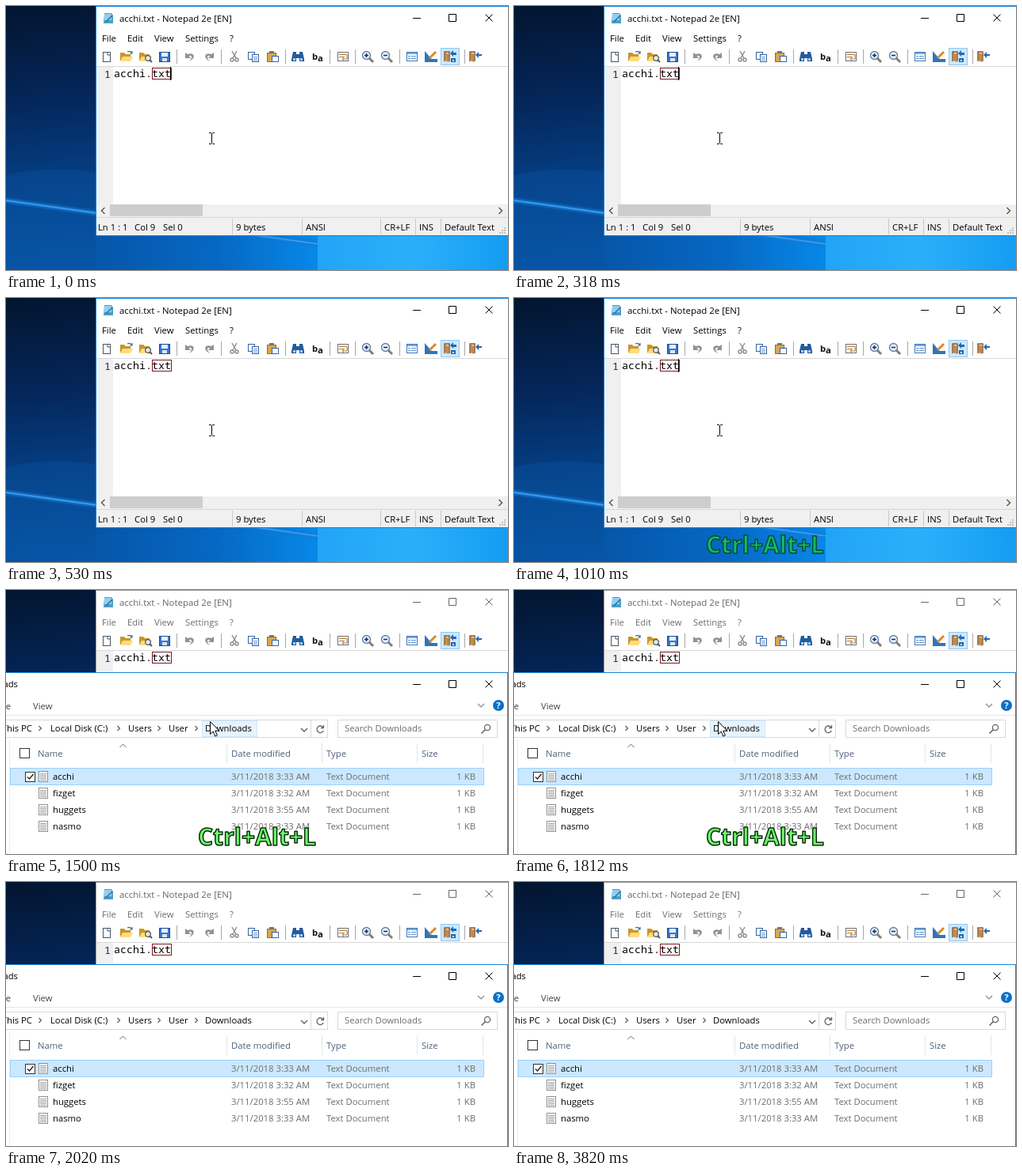
Animation of 633x334 px, one loop 5020 ms. Source, as an HTML page:

```html
<!DOCTYPE html>
<html lang="en">
<head>
<meta charset="utf-8">
<title>Show file in folder</title>
<style>
html, body { margin: 0; width: 100%; height: 100%; overflow: hidden; background: #04204a; }
svg { display: block; width: 633px; height: 334px; font: 11.3px "Open Sans", sans-serif; }
text { white-space: pre; }
rect { shape-rendering: crispEdges; }
.mono { font: 13.33px "Noto Sans Mono", monospace; }
.hint { font: bold 30px "Open Sans", sans-serif; stroke-width: 1.5px; stroke-linejoin: round; }
</style>
</head>
<body>
<svg id="stage" viewBox="0 0 633 334"></svg>
<script>
const stage = document.getElementById('stage');

const text = (x, y, s, fill = '#000', extra = '') => `<text x="${x}" y="${y}" fill="${fill}" ${extra}>${s}</text>`;
const box = (x, y, w, h, fill, extra = '') => `<rect x="${x}" y="${y}" width="${w}" height="${h}" fill="${fill}" ${extra}/>`;
const frame = (x, y, w, h, stroke, fill = 'none') => box(x + .5, y + .5, w - 1, h - 1, fill, `stroke="${stroke}"`);
const line = (d, stroke = '#333', width = 1, fill = 'none') => `<path d="${d}" stroke="${stroke}" stroke-width="${width}" fill="${fill}"/>`;
const fill = (d, color) => `<path d="${d}" fill="${color}"/>`;
const disc = (x, y, r, color, stroke = 'none', w = 1) => `<circle cx="${x}" cy="${y}" r="${r}" fill="${color}" stroke="${stroke}" stroke-width="${w}"/>`;
const at = (x, y, s) => `<g transform="translate(${x} ${y})">${s}</g>`;
const group = (id, s) => `<g id="${id}">${s}</g>`;

const captionButtons = y => line(`M513 ${y + .5}h10M558.5 ${y - 4.5}h9v9h-9zM604.5 ${y - 4.5}l9 9m0-9l-9 9`, 'currentColor');

function gradient(id, dir, ...stops) {
  const marks = stops.map(([pos, color]) => `<stop offset="${pos}" stop-color="${color}"/>`).join('');
  return `<linearGradient id="${id}" ${dir}>${marks}</linearGradient>`;
}

function wallpaper() {
  const down = 'x1="0" y1="0" x2="0" y2="1"';
  return gradient('sky', 'x1="0" y1="0" x2=".2" y2="1"', [0, '#03152f'], [.35, '#04265a'], [.6, '#053a7c'], [1, '#06509e']) +
    gradient('floor', '', [0, '#0656a8'], [.3, '#0668c4'], [.55, '#078aea'], [1, '#12a0f8']) +
    gradient('pane', '', [0, '#22a4f6'], [.5, '#2ab0fa'], [1, '#159cf2']) +
    gradient('beam', down, [0, '#0e6cc600'], [.5, '#1c84e0'], [1, '#0e6cc600']) +
    box(0, 0, 633, 334, 'url(#sky)') +
    fill('M0 214Q50 202 114 210V262L0 246Z', '#0b62b440') +
    fill('M0 247L420 306V334H0Z', '#0a62b855') +
    box(113, 291, 520, 43, 'url(#floor)') +
    `<g transform="rotate(8 0 246)">${box(0, 241, 400, 10, 'url(#beam)')}</g>` +
    line('M0 246L400 302', '#3c9eee', 1.6) +
    box(393, 291, 240, 43, 'url(#pane)');
}

function page(x, y, w = 9, h = 12, edge = '#456') {
  return frame(x, y, w, h, edge, '#fff');
}

function folder(extra) {
  return fill('M-8-5h5l2 2h6v8h-13z', '#c9962c') + fill('M-5 0h13l-3 6h-13z', '#ffdc7c') + extra;
}

function lens(sign) {
  return line('M2 2l5 5', '#8a7a74', 3) + disc(-1.5, -1.5, 5, '#e4f2ff', '#66809c', 1.4) + line(sign, '#226', 1.5);
}

function door() {
  return line('M-7 6V-6H-1V6', '#8b5a2b', 1.5, '#f2dfc0') + fill('M-6-5l4 2v10l-4-2z', '#c58a48');
}

const undo = fill('M-6-5v7h7l-2.5-2.5C2-3 4 1-1 6C8 2 6-6-3-3z', '#8d9498');

const icons = [
  [127, page(-5, -6, 10, 13) + line('M1-6v4h4', '#456')],
  [152, folder(line('M1-6q4-2 6 2m0-3v3h-3', '#278', 1.2))],
  [176, folder(disc(3, 2, 3.3, '#d8efff', '#555', 1.2) + line('M5 4l3 3', '#555', 2))],
  [200, frame(-7, -6, 14, 13, '#174a94', '#3777cc') + box(-4, -5, 8, 5, '#e8f2ff') + box(-3, 2, 6, 4, '#dfe6ee')],
  [232, undo],
  [256, `<g transform="scale(-1 1)">${undo}</g>`],
  [288, line('M-3-7L2 2M3-7L-2 2', '#8b9095', 1.5) + disc(-3, 4, 2, 'none', '#8b9095', 1.5) + disc(3, 4, 2, 'none', '#8b9095', 1.5)],
  [312, page(-7, -6, 9, 10, '#37639c') + page(-2, -3, 9, 10, '#37639c') + line('M0 .5h5M0 2.5h5M0 4.5h5', '#6c9bd8')],
  [336, frame(-7, -5, 12, 12, '#9b6a22', '#d9a650') + box(-4, -7, 6, 3, '#777') + page(-1, -1, 9, 8, '#37639c')],
  [368, fill('M-6-6h4v3h4v-3h4l2 9v3h-6v-4h-4v4h-6v-3z', '#245b9d') + box(-6, 2, 3, 3, '#9fd0ff') + box(3, 2, 3, 3, '#9fd0ff')],
  [393, text(-7, 4, 'b', '#111', 'font-weight="700"') + text(0, 6, 'a', '#111', 'font-weight="700"')],
  [425, frame(-7, -6, 14, 12, '#68707c', '#fff') + line('M-5-2.5h10M-5 .5h7M5-2v5h-6m2-2l-2 2l2 2', '#b07a28')],
  [456, lens('M-4-1.5h5M-1.5-4v5')],
  [480, lens('M-4-1.5h5')],
  [512, frame(-7, -6, 14, 12, '#3b78bd', '#fff') + box(-6, -5, 12, 2, '#6eaaf0') + line('M-5-.5h3m1 0h6M-5 2.5h3m1 0h6', '#5a8bc4')],
  [536, fill('M-8-7L4 7H-8z', '#2f75bd') + box(-8, 3, 16, 4, '#2f75bd') + line('M-2 2L6-6', '#d58a31', 3)],
  [560, door() + fill('M8-5h-4v-3l-4 4 4 4v-2h4z', '#2468ad') + box(1, 2, 6, 5, '#2468ad') + box(3, 4, 2, 2, '#fff')],
  [592, door() + fill('M8-3h-4v-3l-4 4 4 4v-3h4z', '#2468ad')],
];

function editor() {
  const menus = [[121, 'File'], [153, 'Edit'], [187, 'View'], [226, 'Settings'], [282, '?']];
  const status = [[116, 'Ln 1 : 1'], [162, 'Col 9'], [198, 'Sel 0'], [290, '9 bytes'], [378, 'ANSI'],
    [477, 'CR+LF'], [521, 'INS'], [553, 'Default Text']];
  return box(113, 0, 520, 291, '#fff') +
    fill('M124 9h9l2 3v10h-12z', '#4a9fc8') + box(124, 10, 9, 8, '#8fd0f2') + line('M126 20l8-8', '#2a6d9c', 1.5) +
    group('title', text(143, 20, 'acchi.txt - Notepad 2e [EN]', 'currentColor', 'font-size="11.45"') + captionButtons(15)) +
    group('menu', menus.map(([x, s]) => text(x, 45, s, 'currentColor')).join('')) +
    frame(548, 53, 24, 22, '#90c8f6', '#cce8ff') +
    [215, 271, 352, 408, 440, 496, 578].map(x => box(x, 55, 1, 18, '#a8a8a8')).join('') +
    icons.map(([x, s]) => at(x, 64, s)).join('') +
    box(114, 76, 519, 1, '#d8d8d8') + box(114, 77, 21, 174, '#f0f0f0') +
    text(124, 91, '1', '#302048', 'class="mono"') + text(136, 90, 'acchi.txt', '#000', 'class="mono"') +
    frame(184, 78, 25, 15, '#7c1620') + group('caret', box(207, 77, 1, 17, '#000')) +
    box(114, 251, 519, 16, '#f0f0f0') + box(131, 251, 117, 15, '#cdcdcd') +
    line('M124.5 255l-4 4 4 4M621.5 255l4 4-4 4', '#70583c', 1.5) +
    box(114, 267, 519, 23, '#f0f0f0') + box(114, 267, 519, 1, '#d7d7d7') +
    [285, 373, 472, 516, 548].map(x => box(x, 269, 1, 20, '#c8c8c8')).join('') +
    status.map(([x, y]) => text(x, 284, y)).join('') +
    [0, 1, 2].map(i => [0, 1, 2].map(j => i + j > 1 ? box(622 + i * 3, 280 + j * 3, 2, 2, '#bfbfbf') : '').join('')).join('') +
    group('edge', box(113, 0, 1, 291, 'currentColor') + box(113, 0, 520, 1, 'currentColor') + box(113, 290, 520, 1, 'currentColor'));
}

function explorer() {
  const crumbs = [[56, 'Local Disk (C:)'], [154, 'Users'], [205, 'User']];
  const files = [['acchi', 33], ['fizget', 32], ['huggets', 55], ['nasmo', 33]];
  const columns = [[40, 'Name'], [284, 'Date modified'], [404, 'Type'], [524, 'Size']];
  const row = ([name, minute], i) => {
    const y = 240 + i * 21;
    return page(41, y - 11, 12, 14, '#909090') +
      line([0, 2, 4, 6, 8].map(k => `M43 ${y - 7.5 + k}h8`).join(''), '#a0a0a0') + text(59, y, name) +
      text(284, y, `3/11/2018 3:${minute} AM`, '#6d6d6d') + text(404, y, 'Text Document', '#6d6d6d') +
      text(592, y, '1 KB', '#6d6d6d', 'text-anchor="end"');
  };
  return box(0, 104, 633, 230, '#fff') + box(0, 104, 633, 1, '#1883d7') + box(632, 104, 1, 230, '#1883d7') +
    text(15, 123, 'Downloads', '#000', 'text-anchor="end"') + captionButtons(119) +
    text(6, 151, 'Share', '#444', 'text-anchor="end"') + text(34, 151, 'View', '#444') +
    line('M595 144l4 4 4-4', '#888', 1.2) + disc(621, 146, 7, '#0a6fc8') +
    text(621, 150, '?', '#fff', 'font-weight="700" text-anchor="middle"') +
    box(0, 158, 632, 1, '#e6e6e6') + frame(-2, 164, 408, 23, '#d9d9d9') + box(384, 165, 1, 21, '#d9d9d9') +
    group('hover', frame(247, 165, 70, 21, '#cce8ff', '#e5f3ff')) +
    text(33, 179, 'This PC', '#000', 'text-anchor="end"') + crumbs.map(([x, s]) => text(x, 179, s)).join('') +
    text(251, 179, 'Downloads') +
    [43, 142, 193, 240].map(x => line(`M${x - 1.5} 172l3 3-3 3`, '#555', 1.1)).join('') +
    line('M372 175l4 4 4-4', '#666', 1.5) +
    line('M400 174a4.3 4.3 0 1 0 .3 4M400.5 171v3.5h-3.5', '#666', 1.3) +
    frame(418, 164, 202, 23, '#d9d9d9') + text(427, 179, 'Search Downloads', '#6d6d6d') +
    disc(607, 174, 3.6, 'none', '#666', 1.3) + line('M604.5 176.5l-5 5', '#666', 1.6) +
    box(4, 189, 1, 145, '#ececec') + frame(17, 200, 13, 13, '#333', '#fff') +
    columns.map(([x, s]) => text(x, 211, s, '#4c607a')).join('') +
    [278, 398, 518, 601].map(x => box(x, 194, 1, 25, '#e5e5e5')).join('') +
    line('M143.5 199l4-4 4 4', '#666') +
    frame(5, 225, 598, 22, '#99d1ff', '#cce8ff') + frame(24, 230, 13, 13, '#333', '#fff') +
    line('M27 236.5l2.5 2.5 5-6', '#222', 1.4) + files.map(row).join('');
}

stage.innerHTML = wallpaper() + editor() + group('explorer', explorer()) +
  group('ibeam', line('M256 160.5h2.5l1 1 1-1h2.5M259.5 161v12M256 174.5h2.5l1-1 1 1h2.5', '#000')) +
  group('arrow', line('M257.5 166.5v16l3.7-3.5 2.6 6 2.6-1.1-2.6-5.8h5z', '#000', 1, '#fff')) +
  group('hint', text(242, 323, 'Ctrl+Alt+L', 'currentColor', 'class="hint"'));

const el = id => document.getElementById(id);
const show = (id, on) => el(id).style.display = on ? '' : 'none';
const tint = (id, color) => el(id).style.color = color;

function draw(now) {
  const t = now % 5020;
  const opened = t >= 1500, pointing = opened && t < 2020;
  show('caret', t < 530 || t >= 1010 && !opened);
  show('explorer', opened);
  show('ibeam', !opened);
  show('arrow', pointing);
  show('hover', pointing);
  show('hint', t >= 1010 && t < 2020);
  tint('hint', opened ? '#70ff70' : '#0cbf62');
  el('hint').style.stroke = opened ? '#0a300a' : '#064a3a';
  tint('title', opened ? '#666' : '#000');
  tint('menu', opened ? '#6d6d6d' : '#000');
  tint('edge', opened ? '#9a9a9a' : '#1883d7');
  requestAnimationFrame(draw);
}
draw(performance.now());
</script>
</body>
</html>
```
